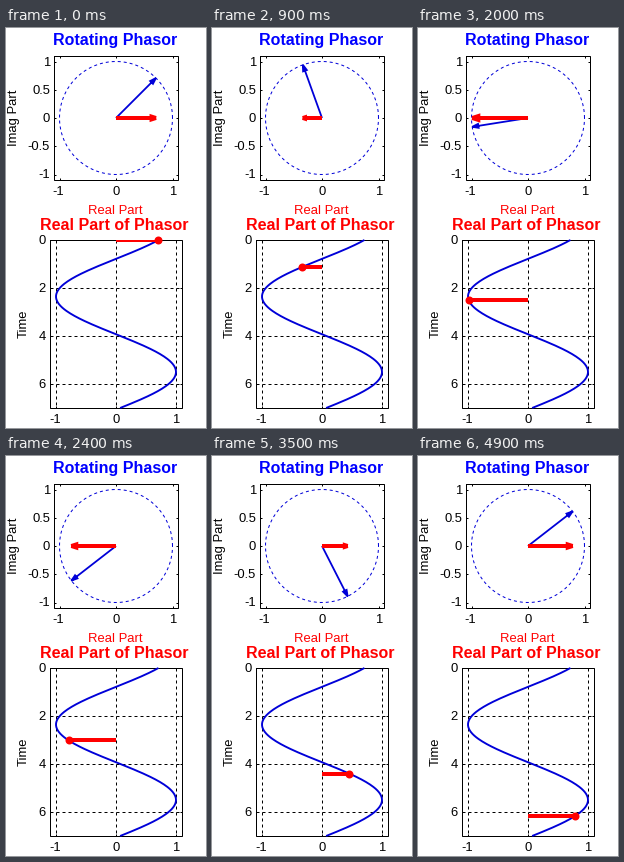
These frames come from a looping animation (200 px wide and 400 px high, 5000 ms). A matplotlib script:

```python
import numpy as np
import matplotlib.pyplot as plt
from matplotlib.animation import FuncAnimation

plt.rcParams["font.family"] = "Liberation Sans"

WIDTH, HEIGHT, DPI = 200, 400, 100
PX = 72 / DPI  # points per pixel
FRAMES, INTERVAL = 50, 100
PHASE = np.pi / 4
BLUE, RED = "#0000d8", "#ff0000"

CX, CY, RADIUS = 110, 90, 56.5      # phasor plot
WAVE_X, WAVE_Y = 110, 212           # wave plot origin
AMPLITUDE, TIME_SCALE = 60, 24

fig = plt.figure(figsize=(WIDTH / DPI, HEIGHT / DPI), dpi=DPI, facecolor="white")
ax = fig.add_axes([0, 0, 1, 1])
ax.set_xlim(0, WIDTH)
ax.set_ylim(HEIGHT, 0)
ax.axis("off")


def line(x, y, color="black", width=1, **style):
    style.setdefault("solid_capstyle", "butt")
    return ax.plot(x, y, color=color, lw=width * PX, **style)[0]


def text(x, y, label, size=13, color="black", ha="center", **style):
    ax.text(x, y, label, fontsize=size * PX, color=color, ha=ha,
            va="baseline", rotation_mode="anchor", **style)


def frame_box(left, top, right, bottom, xticks, yticks):
    line([left, right, right, left, left], [top, top, bottom, bottom, top],
         solid_joinstyle="miter", zorder=3)
    for x in xticks:
        line([x, x], [top, top + 2], zorder=3)
        line([x, x], [bottom - 2, bottom], zorder=3)
    for y in yticks:
        line([left, left + 2], [y, y], zorder=3)
        line([right - 2, right], [y, y], zorder=3)


def wave_point(t):
    return WAVE_X + AMPLITUDE * np.cos(t + PHASE), WAVE_Y + TIME_SCALE * t


def arrow_points(dx, dy):
    """Shaft followed by a small head whose size follows the length."""
    tip = np.array([CX + dx, CY + dy])
    along = np.array([dx, dy])
    across = np.array([-dy, dx])
    base = tip - 0.11 * along
    left, right = base + 0.035 * across, base - 0.035 * across
    return np.array([[CX, CY], tip, left, right, tip]).T


# Phasor plot
levels = [1, 0.5, 0, -0.5, -1]
frame_box(48, 28, 172, 152,
          [CX + RADIUS * v for v in (-1, 0, 1)], [CY - RADIUS * v for v in levels])
angle = np.linspace(0, 2 * np.pi, 200)
line(CX + RADIUS * np.cos(angle), CY - RADIUS * np.sin(angle), BLUE,
     dashes=(3, 3), zorder=2)
for v in levels:
    text(44, CY - RADIUS * v + 4, f"{v:g}", ha="right")
for x, label in zip((52, 110, 167), ("-1", "0", "1")):
    text(x, 167, label)
text(109.5, 17.5, "Rotating Phasor", 16, "#0000ff", weight="bold")
text(109.5, 186, "Real Part", color=RED)
text(11, 90, "Imag Part", rotation=90)

# Wave plot
columns = [WAVE_X + AMPLITUDE * v for v in (-1, 0, 1)]
rows = [WAVE_Y + TIME_SCALE * v for v in (2, 4, 6)]
frame_box(44, 212, 176, 380, columns, rows)
for x in columns:
    line([x, x], [212, 380], dashes=(3, 3), zorder=1)
for y in rows:
    line([44, 176], [y, y], dashes=(3, 3), zorder=1)
line(*wave_point(np.linspace(0, 7, 200)), BLUE, 1.9, zorder=4)
for v in (0, 2, 4, 6):
    text(40, WAVE_Y + TIME_SCALE * v + 4, f"{v}", ha="right")
for x, label in zip((49, 110, 170), ("-1", "0", "1")):
    text(x, 395, label)
text(108.5, 201.5, "Real Part of Phasor", 16, RED, weight="bold")
text(21, 296, "Time", rotation=90)

# Moving parts
phasor = line([], [], BLUE, 1.8, zorder=5, solid_joinstyle="miter")
real_part = line([], [], RED, 4, zorder=6, solid_joinstyle="miter")
bar = line([], [], RED, 4, zorder=6)
bar.set_clip_path(plt.Rectangle((44, 212), 133, 169, transform=ax.transData))
dot = line([], [], RED, marker="o", markersize=8 * PX,
           markeredgewidth=0, zorder=7)


def update(frame):
    t = 2 * np.pi * frame / FRAMES
    dx, dy = RADIUS * np.cos(t + PHASE), -RADIUS * np.sin(t + PHASE)
    phasor.set_data(*arrow_points(dx, dy))
    real_part.set_data(*arrow_points(dx, 0))
    x, y = wave_point(t)
    bar.set_data([WAVE_X, x], [y, y])
    dot.set_data([x], [y])
    return phasor, real_part, bar, dot


anim = FuncAnimation(fig, update, frames=FRAMES, interval=INTERVAL,
                     repeat=True, repeat_delay=0, blit=False)
plt.show()
```
